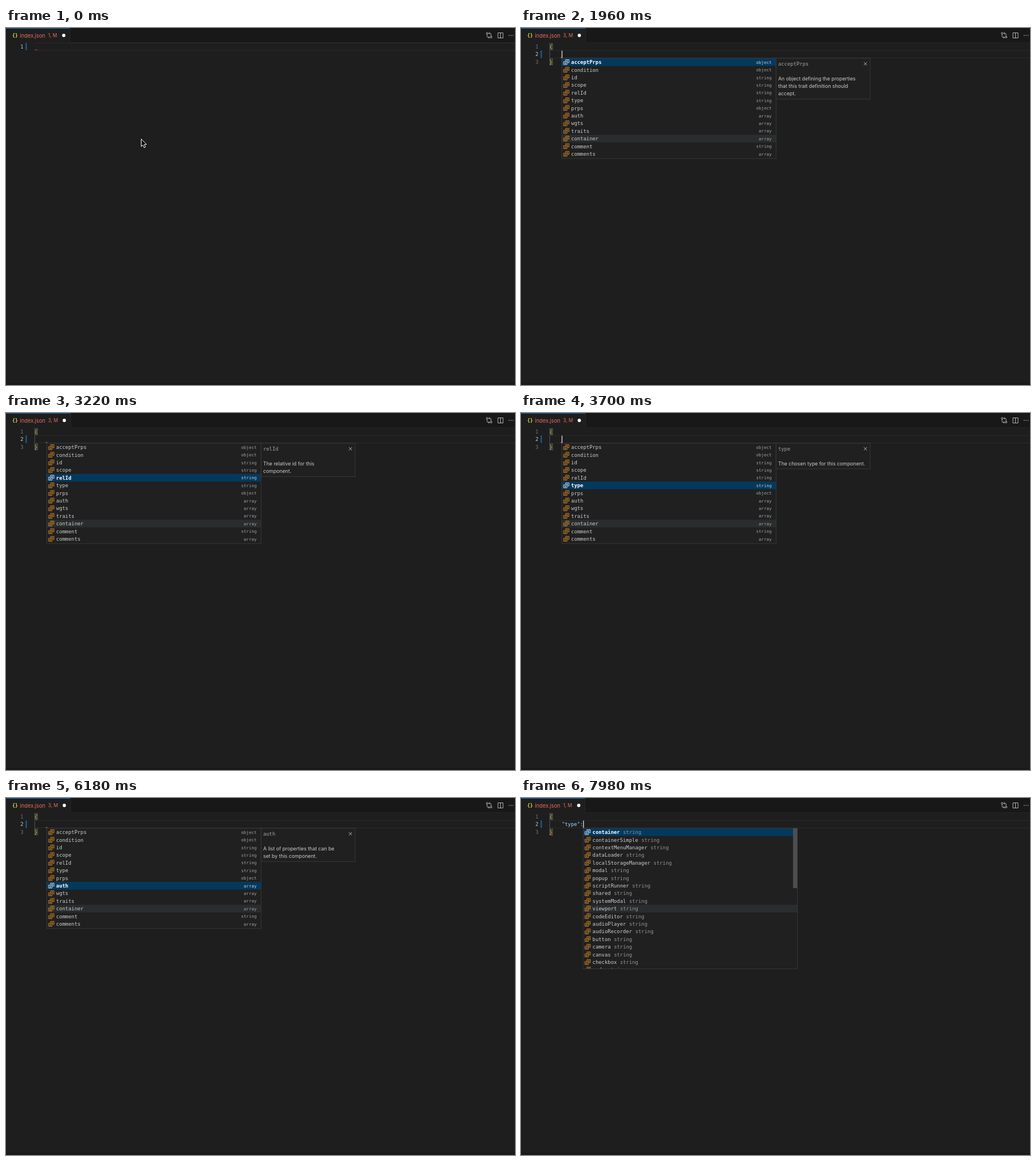
Write an HTML page that moves like this. It is 894 by 626 pixels and loops after 8000 ms.

```html
<!DOCTYPE html>
<html lang="en">
<head>
<meta charset="utf-8">
<title>Editor suggestions</title>
<style>
  html, body { margin: 0; width: 100%; height: 100%; overflow: hidden; background: #1e1e1e; }
  svg { display: block; width: 894px; height: 626px; }
  text { white-space: pre; }
  .mono { font: 8.9px "DejaVu Sans Mono", monospace; }
  .small { font: 7.5px "DejaVu Sans Mono", monospace; }
  .ui { font: 8.75px Inter, sans-serif; }
  .tab { font: 9.25px Inter, sans-serif; fill: #e5705f; }
  .bold { font-weight: bold; }
</style>
</head>
<body>
<svg id="stage" viewBox="0 0 894 626" xmlns="http://www.w3.org/2000/svg"></svg>
<script>
const LOOP = 8000, LINE = 13.4, CHAR = 5.36, ROW_TOP = 53.2;
const stage = document.getElementById('stage');

function add(parent, name, attrs = {}, text) {
  const node = document.createElementNS(stage.namespaceURI, name);
  for (const key in attrs) node.setAttribute(key, attrs[key]);
  if (text !== undefined) node.textContent = text;
  return parent.appendChild(node);
}
const group = (parent = stage, attrs) => add(parent, 'g', attrs);
const rect = (parent, x, y, width, height, fill, more) =>
  add(parent, 'rect', { x, y, width, height, fill, ...more });
const label = (parent, x, y, text, fill, cls = 'mono', more) =>
  add(parent, 'text', { x, y, fill, class: cls, ...more }, text);
const stroke = (parent, d, color, width = 1) =>
  add(parent, 'path', { d, fill: 'none', stroke: color, 'stroke-width': width });
const show = (node, on) => node.setAttribute('visibility', on ? 'visible' : 'hidden');

const properties = [
  ['acceptPrps', 'object', ['An object defining the properties', 'that this trait definition should', 'accept.']],
  ['condition', 'object', ['A comparison object which when', 'resolves to true, will render this', 'component. If resolves to false, this', 'component will not be rendered.']],
  ['id', 'string', ['The id for this component.']],
  ['scope', 'string', ['The scope for this component.']],
  ['relId', 'string', ['The relative id for this', 'component.']],
  ['type', 'string', ['The chosen type for this component.']],
  ['prps', 'object', ['The properties for this component.']],
  ['auth', 'array', ['A list of properties that can be', 'set by this component.']],
  ['wgts', 'array', ['A list of children which will be', 'rendered inside this component.']],
  ['traits', 'array'], ['container', 'array'], ['comment', 'string'], ['comments', 'array']
];
const values = ('container containerSimple contextMenuManager dataLoader localStorageManager modal popup ' +
  'scriptRunner shared systemModal viewport codeEditor audioPlayer audioRecorder button camera canvas checkbox code').split(' ');

// Window chrome
rect(stage, 0, 0, 894, 626, '#1e1e1e');
rect(stage, 0, 0, 894, 25.5, '#181818');
rect(stage, 0, 25, 894, 1, '#252525');
rect(stage, 0, 0, 1, 626, '#191919');
rect(stage, 0, 622, 894, 4, '#191919');
const tabBack = rect(stage, 1, 0, 111, 26, '#1e1e1e');
const tabTop = rect(stage, 1, 0, 111, 1, '#0871bd');
const tabEdge = rect(stage, 112, 0, 1, 25, '#272727');
label(stage, 10.8, 16, '{}', '#d8cf4b', 'mono bold', { 'letter-spacing': -.5 });
label(stage, 24.6, 16.5, 'index.json', '', 'tab');
const problems = label(stage, 74, 16.4, '', '', 'tab', { style: 'font-size:8.3px' });
const dirtyDot = add(stage, 'circle', { cy: 13, r: 2.9, fill: '#fff' });

const iconInk = '#c5c5c5';
stroke(stage, 'M845 11V14.7Q845 16.5 847 16.5H849M847.5 14.8L849.3 16.5L847.5 18.2M852 14.4V11.3Q852 9.3 850 9.3H848M849.6 7.6L847.8 9.3L849.6 11', iconInk, .9);
for (const [cx, cy] of [[845, 9.4], [852, 16]])
  add(stage, 'circle', { cx, cy, r: 1.5, fill: '#181818', stroke: iconInk, 'stroke-width': .9 });
stroke(stage, 'M864 8.5H873V17.5H864ZM868.5 8.5V17.5', iconInk, .9);
for (const cx of [883.8, 887.2, 890.6]) add(stage, 'circle', { cx, cy: 13, r: .8, fill: iconInk });

// Editor lines
const current = group();
rect(current, 50, 25.8, 844, 1, '#2b2b2b');
rect(current, 50, 38.6, 844, 1, '#2b2b2b');
rect(current, 34.5, 26, 2, 13.2, '#19649c');
const numbers = [1, 2, 3].map((n, i) =>
  label(stage, 30.6, 36 + LINE * i, n, '', 'mono', { 'text-anchor': 'end' }));
const guide = rect(stage, 50, 39.5, 1, 13, '#505050');
function bracket(char) {
  const g = group();
  rect(g, 50.3, 27.2, 5, 10.8, '#27302a', { stroke: '#777', 'stroke-width': .7 });
  label(g, 50, 36, char, '#f2cf35');
  return g;
}
const openBrace = bracket('{'), closeBrace = bracket('}');
const squiggle = stroke(stage, 'M0 1.2L1.4 0L2.8 1.2L4.2 0L5.6 1.2', '#d8493f', .8);
const lineMark = stroke(stage, 'M69.5 51.7H72.5', '#c98232', 1);
const typed = group();
label(typed, 71.7, 49.4, '"type"', '#9cdcfe');
label(typed, 71.7 + CHAR * 6, 49.4, ':', '#ccc');

// Suggestion lists
function enumIcon(parent, x, y) {
  return stroke(parent, `M${x + 4} ${y + 3.5}V${y + .6}H${x + 10}V${y + 6}H${x + 7.5}M${x + 5.7} ${y + 2.5}H${x + 8.5}M${x + 7} ${y + 4.3}H${x + 8.5}` +
    `M${x + .5} ${y + 4}H${x + 6.6}V${y + 9.3}H${x + .5}ZM${x + 2} ${y + 6}H${x + 5}M${x + 2} ${y + 7.6}H${x + 5}`, '#d98a27', .9);
}
function makeList(x, height, items, inlineType) {
  const g = group();
  rect(g, x, 53, 376.5, height, '#202020');
  const clip = add(g, 'clipPath', { id: 'clip' + Math.round(x) });
  rect(clip, x, 53, 376.5, height, '#000');
  const body = group(g, { 'clip-path': `url(#clip${Math.round(x)})` });
  rect(body, x, ROW_TOP + LINE * 10, 376.5, LINE, '#2a2d2e');
  const bar = rect(body, x, ROW_TOP, 376.5, LINE, '#04395e');
  const rows = items.map(([name, type], i) => {
    const y = ROW_TOP + LINE * i;
    const icon = enumIcon(body, x + 2.8, y + 1.7);
    const text = label(body, x + 16.6, y + 9.9, name, '#ccc');
    const detail = inlineType
      ? label(body, x + 22 + CHAR * name.length, y + 9.9, type, '#949494')
      : label(body, x + 368.7, y + 9.6, type, '#a0a0a0', 'small', { 'text-anchor': 'end' });
    return { icon, text, detail };
  });
  if (inlineType) rect(body, x + 368.8, 53, 7.7, 105, '#4e4e4e');
  rect(g, x, 53, 376.5, height, 'none', { stroke: '#3d3d3d', 'stroke-width': .8 });
  function select(index) {
    bar.setAttribute('y', ROW_TOP + LINE * index);
    rows.forEach(({ icon, text, detail }, i) => {
      const on = i === index;
      icon.setAttribute('stroke', on ? '#e6e6e6' : '#d98a27');
      text.setAttribute('fill', on ? '#fff' : '#ccc');
      text.setAttribute('class', on ? 'mono bold' : 'mono');
      if (!inlineType) detail.setAttribute('fill', on ? '#c2ccd3' : '#a0a0a0');
    });
  }
  select(0);
  return { g, select };
}
const propertyList = makeList(71.5, 176, properties);
const valueList = makeList(109, 246.6, values.map(name => [name, 'string']), true);

// Documentation panels, one per selectable property
const docs = properties.filter(p => p[2]).map(([name, , lines]) => {
  const g = group();
  rect(g, 448, 53, 165.2, 31.6 + LINE * lines.length, '#202020', { stroke: '#3d3d3d', 'stroke-width': .8 });
  label(g, 451.7, 66.2, name, '#a2a2a2');
  stroke(g, 'M602.2 60L607.6 65.4M607.6 60L602.2 65.4', '#c8c8c8', .9);
  lines.forEach((line, i) => label(g, 451.8, 91.6 + LINE * i, line, '#ccc', 'ui'));
  return g;
});

const caret = rect(stage, 0, 0, 1.4, 12.8, '#d4d4d4');
const pointer = add(stage, 'path', {
  d: 'M237.5 194.6V207.8L240.5 205L242.6 209.8L244.9 208.8L242.8 204.2H246.8Z',
  fill: '#050505', stroke: '#fff', 'stroke-width': 1, 'stroke-linejoin': 'round'
});

const TYPE_BRACE = 220, ENTER = 460, OPEN = 780, ACCEPT = 7320, VALUES = 7500;
const selections = [[0, 0], [2440, 1], [2820, 2], [2960, 3], [3100, 4], [3480, 5], [3920, 6],
  [4480, 7], [4720, 8], [5980, 7], [6240, 6], [6640, 5]];
const place = (node, x, y) => node.setAttribute('transform', `translate(${x} ${y})`);

function render(t) {
  const braces = t >= TYPE_BRACE, split = t >= ENTER, accepted = t >= ACCEPT;
  const picked = selections.filter(([at]) => at <= t).pop()[1];
  const listOpen = t >= OPEN && !accepted;
  const manyErrors = t >= 1000 && t < 7860;

  problems.textContent = manyErrors ? '3, M' : '1, M';
  const grow = manyErrors ? 1 : 0;
  tabBack.setAttribute('width', 111 + grow);
  tabTop.setAttribute('width', 111 + grow);
  tabEdge.setAttribute('x', 112 + grow);
  dirtyDot.setAttribute('cx', 101.4 + grow);

  place(current, 0, split ? LINE : 0);
  numbers.forEach((n, i) => {
    show(n, split || i === 0);
    n.setAttribute('fill', i === (split ? 1 : 0) ? '#ccc' : '#6e7681');
  });
  show(guide, split);
  show(openBrace, braces);
  show(closeBrace, braces);
  place(closeBrace, split ? 0 : CHAR, split ? LINE * 2 : 0);
  show(squiggle, !braces || accepted);
  place(squiggle, 50, accepted ? 64.4 : 37.6);
  show(lineMark, split && !accepted);
  show(typed, accepted);

  show(propertyList.g, listOpen);
  propertyList.select(picked);
  docs.forEach((g, i) => show(g, listOpen && i === picked));
  show(valueList.g, t >= VALUES);

  const blinkOn = (t - ENTER) % 1000 <= 510;
  show(caret, accepted || (split ? blinkOn : t >= 20));
  caret.setAttribute('x', accepted ? 109 : split ? 71.3 : braces ? 55.3 : 50);
  caret.setAttribute('y', split ? 39.7 : 26.3);
  show(pointer, !braces);
}

const start = performance.now();
function frame() {
  render((performance.now() - start) % LOOP);
  requestAnimationFrame(frame);
}
render(0);
requestAnimationFrame(frame);
</script>
</body>
</html>
```
